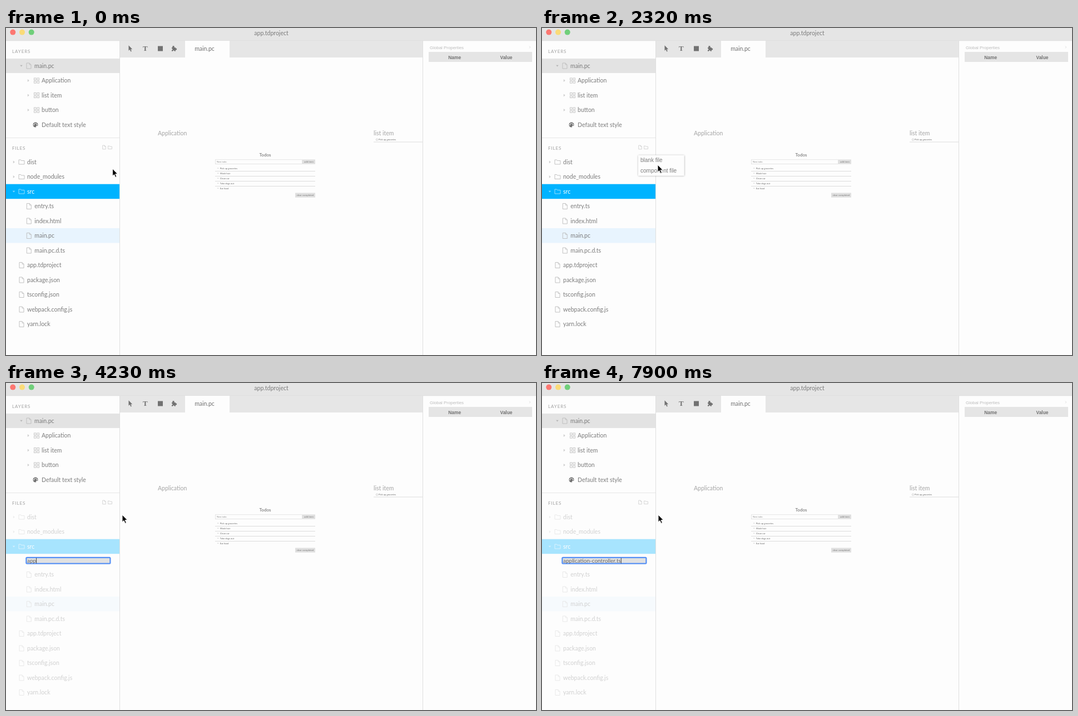
Recreate the animation shown at these times as an HTML page with a canvas. Size 953 by 588 pixels, loop 8 s.

```html
<!DOCTYPE html>
<html lang="en">
<head>
<meta charset="utf-8">
<title>app.tdproject</title>
<style>
html, body { margin: 0; width: 100%; height: 100%; overflow: hidden; background: #fdfdfd; }
canvas { display: block; width: 953px; height: 588px; }
</style>
</head>
<body>
<canvas id="stage" width="953" height="588"></canvas>
<script>
const ctx = document.getElementById('stage').getContext('2d');
const LOOP = 8000, ROW = 26.5, TAU = Math.PI * 2;
const SANS = 'Lato, sans-serif', ARIAL = '"Liberation Sans", Arial, sans-serif';
const PAPER = '#fdfdfd', GREY = '#e5e5e5', INK = '#7c7c7c', DARK = '#717171', ICON = '#bcbcbc';

const STOPS = [
  [60, 191.5, 253], [170, 176, 241], [410, 176.5, 254], [650, 176.5, 254],
  [1010, 166, 220], [1130, 166, 219], [1490, 176, 217], [1850, 176, 217],
  [2320, 208, 246], [2440, 208, 246], [2800, 209, 237]
];
const HAND_FROM = 1370, MENU_FROM = 1850, HAND_TO = 1970, EDIT_FROM = 3160;

const NAME = 'application-controller.ts';
// Typing bursts: start, ticks, letters shown at the end
const BURSTS = [
  [3760, 1, 1], [4110, 2, 3], [4700, 2, 0], [5170, 5, 5],
  [5880, 5, 12], [6830, 7, 22], [7780, 2, 25]
];
const TICK = 117.5;

const LAYERS = ['Application', 'list item', 'button'];
const FOLDERS = ['dist', 'node_modules', 'src'];
const SOURCES = ['entry.ts', 'index.html', 'main.pc', 'main.pc.d.ts'];
const CONFIGS = ['app.tdproject', 'package.json', 'tsconfig.json', 'webpack.config.js', 'yarn.lock'];
const TODOS = ['Pick up groceries', 'Wash hair', 'Clean car', 'Take dogs out', 'Eat food'];

const clamp = v => Math.min(1, Math.max(0, v));
const smooth = v => v * v * (3 - 2 * v);

function pointerAt(time) {
  const t = Math.floor((time - 51.5) / 119.5 + 0.01) * 119.5 + 51.5;
  let [, x, y] = STOPS[0];
  for (let i = 1; i < STOPS.length; i++) {
    const [from] = STOPS[i - 1], [to, nx, ny] = STOPS[i];
    const k = smooth(clamp((t - from) / (to - from)));
    x += (nx - x) * k;
    y += (ny - y) * k;
  }
  return [x, y];
}

function lettersAt(t) {
  let count = 0;
  for (const [start, ticks, to] of BURSTS) {
    if (t < start) break;
    const done = Math.floor((t - start) / TICK + 0.01) + 1;
    count += Math.round((to - count) * clamp(done / ticks));
  }
  return NAME.slice(0, count);
}

function box(x, y, w, h, color) {
  ctx.fillStyle = color;
  ctx.fillRect(x, y, w, h);
}

function frame(x, y, w, h, color, width = 0.8) {
  ctx.strokeStyle = color;
  ctx.lineWidth = width;
  ctx.strokeRect(x, y, w, h);
}

function text(s, x, y, { size = 10.5, color = INK, font = SANS, weight = 400, align = 'left', gap = 0 } = {}) {
  ctx.font = `${weight} ${size}px ${font}`;
  ctx.letterSpacing = gap + 'px';
  ctx.textAlign = align;
  ctx.fillStyle = color;
  ctx.fillText(s, x, y);
  ctx.letterSpacing = '0px';
}

function path(points, { fill, stroke, width = 1, close = true } = {}) {
  ctx.beginPath();
  points.forEach(([x, y]) => ctx.lineTo(x, y));
  if (close) ctx.closePath();
  if (fill) { ctx.fillStyle = fill; ctx.fill(); }
  if (stroke) { ctx.strokeStyle = stroke; ctx.lineWidth = width; ctx.stroke(); }
}

function disc(x, y, r, color) {
  ctx.beginPath();
  ctx.arc(x, y, r, 0, TAU);
  ctx.fillStyle = color;
  ctx.fill();
}

function at(x, y, scale, draw) {
  ctx.save();
  ctx.translate(x, y);
  ctx.scale(scale, scale);
  draw();
  ctx.restore();
}

function fileIcon(x, y, color = ICON, scale = 1) {
  at(x, y, scale, () => {
    path([[-4, -5], [1, -5], [4, -2], [4, 5], [-4, 5]], { stroke: color, width: 0.9 });
    path([[1, -5], [1, -2], [4, -2]], { stroke: color, width: 0.8, close: false });
  });
}

function folderIcon(x, y, color = ICON, scale = 1) {
  at(x, y, scale, () => path(
    [[-5, -4], [-1.5, -4], [-0.5, -2.5], [5, -2.5], [5, 4], [-5, 4]], { stroke: color, width: 0.9 }));
}

function componentIcon(x, y) {
  for (const dx of [-4.5, 1]) for (const dy of [-4.5, 1]) frame(x + dx, y + dy, 3.6, 3.6, ICON);
}

function chevron(x, y, open, color = '#cfcfcf') {
  path(open ? [[x - 2.3, y - 1.2], [x + 2.3, y - 1.2], [x, y + 1.6]]
            : [[x - 1.2, y - 2.6], [x + 1.8, y], [x - 1.2, y + 2.6]], { fill: color });
}

function paletteIcon(x, y) {
  disc(x, y, 4.5, DARK);
  for (let i = 0; i < 4; i++) {
    const a = Math.PI * (1 + i / 3);
    disc(x + 2.7 * Math.cos(a), y + 2.5 * Math.sin(a), 0.9, PAPER);
  }
  disc(x + 2.6, y + 3.4, 1.7, PAPER);
}

function arrow(x, y, scale, fill, stroke) {
  at(x, y, scale, () => path(
    [[0, 0], [0, 13.2], [3, 10.4], [5.2, 15.4], [7.4, 14.4], [5.2, 9.6], [9.3, 9.6]],
    { fill, stroke }));
}

function hand(x, y) {
  ctx.beginPath();
  ctx.roundRect(x - 1.2, y + 0.8, 2.4, 9, 1.2);
  for (let i = 0; i < 3; i++) ctx.roundRect(x + 1 + i * 2, y + 4.8 + i * 0.5, 2.3, 5, 1.1);
  ctx.roundRect(x - 3.6, y + 6.8, 4, 2.6, 1.2);
  ctx.roundRect(x - 1.4, y + 7.2, 8.6, 6, 2);
  ctx.strokeStyle = '#111';
  ctx.lineWidth = 2;
  ctx.stroke();
  ctx.fillStyle = '#fff';
  ctx.fill();
  for (let i = 0; i < 3; i++) box(x + 1 + i * 2, y + 8.6, 0.7, 3, '#111');
}

function titleBar() {
  box(0, 0, 953, 23, GREY);
  box(0, 22.5, 953, 0.8, '#dcdcdc');
  ['#fc7771', '#fadb78', '#70cf7a'].forEach((color, i) => disc(12.3 + i * 16.7, 7.6, 5, color));
  text('app.tdproject', 477, 13, { align: 'center' });
}

function toolbar() {
  box(205, 23, 544, 30, '#e6e6e6');
  box(322, 23, 80, 30, PAPER);
  arrow(220.5, 31.3, 0.72, DARK);
  text('T', 250.4, 41.3, { size: 13, font: '"Liberation Serif", serif', weight: 700, color: DARK, align: 'center' });
  box(273, 32.5, 9, 9, DARK);
  box(298, 35, 6.8, 6.7, DARK);
  disc(301, 33.8, 1.8, DARK);
  disc(305.4, 38, 1.8, DARK);
  disc(298.2, 38.3, 1.3, '#e6e6e6');
  disc(301.4, 41.5, 1.3, '#e6e6e6');
  text('main.pc', 357, 40.5, { align: 'center', color: DARK });
}

function heading(s, y) {
  text(s, 11, y, { size: 8, gap: 0.9, color: '#a0a0a0' });
}

function layers() {
  heading('LAYERS', 45);
  box(0, 55, 204, 26, '#e3e3e3');
  chevron(27.5, 68, true, '#b5b5b5');
  fileIcon(41, 68);
  text('main.pc', 51, 71.8);
  LAYERS.forEach((name, i) => {
    const y = 68 + ROW * (i + 1);
    chevron(40, y, false);
    componentIcon(55, y);
    text(name, 64, y + 3.8);
  });
  paletteIcon(53, 174);
  text('Default text style', 64, 177.8);
  box(0, 197, 204, 1, '#e6e6e6');
}

function files(editing) {
  heading('FILES', 219);
  fileIcon(176.5, 214.5, ICON, 0.68);
  folderIcon(187, 214.8, ICON, 0.68);
  [...FOLDERS, ...SOURCES, ...CONFIGS].forEach((name, i) => {
    const folder = FOLDERS.includes(name), src = name === 'src';
    const x = SOURCES.includes(name) ? 13.3 : 0;
    const y = 241 + ROW * i + (editing && !folder ? 24 : 0);
    if (src) box(0, y - 13.3, 204, ROW, '#00b3ff');
    if (name === 'main.pc') box(0, y - 13.5, 204, ROW, '#e8f4fe');
    const tint = src ? '#a9e3ff' : ICON;
    if (folder) {
      chevron(14, y, src, src ? '#83d8ff' : '#cfcfcf');
      folderIcon(28, y, tint);
    } else fileIcon(28 + x, y, tint);
    text(name, 38 + x, y + 3.8, { color: src ? '#fff' : INK });
  });
  if (editing) box(0, 228, 204, 335, 'rgba(253,253,253,.66)');
}

function editor(t) {
  const typed = lettersAt(t);
  ctx.beginPath();
  ctx.roundRect(35.3, 312.8, 153.2, 13, 2.5);
  ctx.fillStyle = '#5590f5';
  ctx.fill();
  box(37.5, 315, 148.8, 8.6, '#e1e1e1');
  text(typed, 38, 323, { size: 10, color: '#666' });
  const end = 38 + ctx.measureText(typed).width;
  if (t < 3640 || t >= 3760) box(end, 314.5, 0.9, 9.8, '#333');
}

function button(label, x, y, w) {
  box(x, y, w, 8.2, '#dfdfdf');
  text(label, x + w / 2, y + 5.6, { size: 4.4, color: '#777', align: 'center' });
}

function artboards() {
  text('Application', 273, 193, { color: '#a5a5a5' });
  text('list item', 661, 193, { color: '#a5a5a5' });
  text('Todos', 466, 230.6, { size: 8.1, color: '#666', align: 'center' });
  frame(376.5, 236.8, 156, 7.8, '#dedede');
  text('New todo', 379, 242, { size: 4, color: '#8a8a8a' });
  button('add item', 533, 236.5, 23);
  TODOS.forEach((item, i) => {
    const y = 252.5 + i * 9;
    box(380.3, y - 1.2, 1.8, 1.8, '#dadada');
    text(item, 384.8, y + 1.6, { size: 4.2, color: '#666' });
    if (i < 4) box(376, y + 4.5, 180, 0.8, '#d5d5d5');
  });
  button('clear completed', 520, 296.5, 36);
  ctx.beginPath();
  ctx.arc(667, 200.7, 1.7, 0, TAU);
  ctx.strokeStyle = '#b8b8b8';
  ctx.lineWidth = 0.6;
  ctx.stroke();
  text('Pick up groceries', 670, 202, { size: 4.2, color: '#666' });
  box(661, 204.6, 88, 0.8, '#d5d5d5');
}

function properties() {
  box(749, 23, 1, 565, '#dfdfdf');
  text('Global Properties', 762, 37.5, { size: 7.9, font: ARIAL, color: '#bcbcbc' });
  path([[941, 32.7], [942.7, 34.5], [941, 36.3]], { stroke: '#cfcfcf', width: 0.7, close: false });
  box(760, 43, 186, 18, GREY);
  const head = { size: 8.4, font: ARIAL, weight: 700, color: DARK, align: 'center' };
  text('Name', 806.7, 55.5, head);
  text('Value', 899.5, 55.5, head);
}

function menu() {
  ctx.save();
  ctx.shadowColor = 'rgba(0,0,0,.5)';
  ctx.shadowBlur = 3;
  ctx.shadowOffsetY = 0.5;
  box(172.8, 228.6, 83, 37.2, PAPER);
  ctx.restore();
  const item = { size: 10, font: ARIAL };
  text('blank file', 177, 241.3, item);
  text('component file', 177, 259.6, item);
}

function pointer(t) {
  const [x, y] = pointerAt(t);
  if (t >= HAND_FROM && t < HAND_TO) hand(x, y);
  else arrow(x, y, 1, '#000', '#fff');
}

function draw(t) {
  const editing = t >= EDIT_FROM;
  box(0, 0, 953, 588, PAPER);
  titleBar();
  toolbar();
  layers();
  files(editing);
  box(204, 23, 1, 565, '#dfdfdf');
  artboards();
  properties();
  if (editing) editor(t);
  else if (t >= MENU_FROM) menu();
  pointer(t);
}

const start = performance.now();
function tick() {
  draw((performance.now() - start) % LOOP);
  requestAnimationFrame(tick);
}
tick();
</script>
</body>
</html>
```
